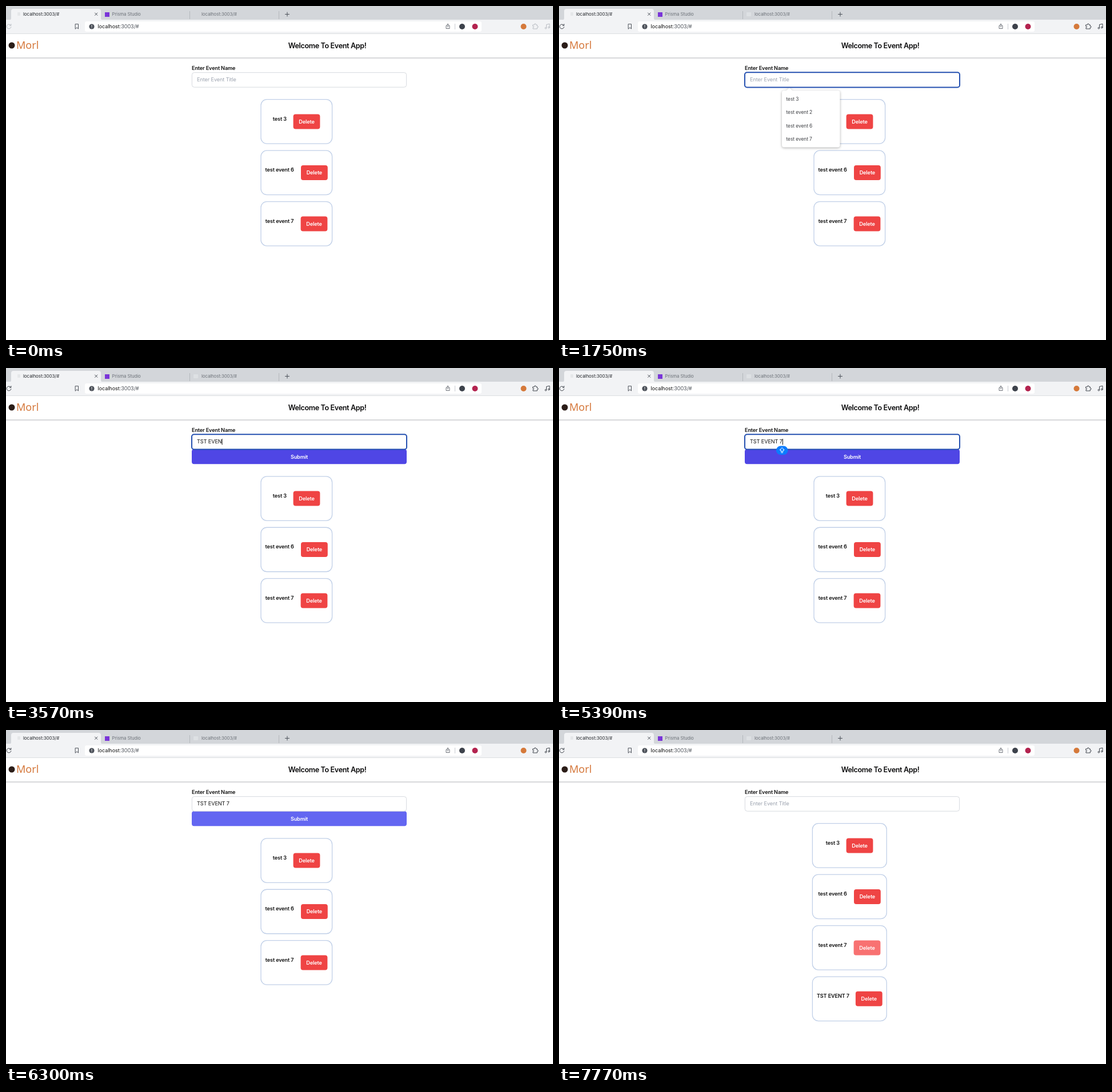
An HTML page that plays this animation: 957x585 px, repeating every 8000 ms.

```html
<!DOCTYPE html>
<html lang="en">
<head>
<title>Event App</title>
<style>
  html, body { margin: 0; width: 100%; height: 100%; overflow: hidden; background: #fff; }
  svg { display: block; width: 957px; height: 585px; }
  text { font: 400 9.14px Inter, sans-serif; letter-spacing: -.01em; fill: #111; white-space: pre; }
  .bold { font-weight: 600; letter-spacing: -.015em; }
  .mid { text-anchor: middle; }
  .white { fill: #fff; }
  .muted { fill: #9ca3af; }
  .tab { font-size: 7.84px; fill: #6c7178; }
  .current { font-size: 8px; fill: #22252a; }
  .menu text { font-size: 8.45px; fill: #3f4145; }
  .title { font-size: 12.6px; font-weight: 600; letter-spacing: -.03em; fill: #0b0b0c; }
  .brand { font: 400 18px "Noto Sans", sans-serif; letter-spacing: 0; fill: #d5783c; }
  .line { fill: none; stroke: #4b5058; stroke-width: 1; stroke-linecap: round; stroke-linejoin: round; }
  .card { fill: #fff; stroke: #c1d0e8; stroke-width: 1.3; }
  .menu { filter: drop-shadow(0 1px 2px #0005); }
</style>
</head>
<body>
<svg viewBox="0 0 957 585">
  <!-- tab strip -->
  <rect width="957" height="25" fill="#d3d6da"/>
  <path d="M5 25q4 0 4-4V9q0-4 4-4H162q4 0 4 4V21q0 4 4 4z" fill="#f2f3f5"/>
  <rect x="20" y="11" width="5" height="6" rx="1" fill="#e6e8ea"/>
  <text class="tab current" x="30" y="14" dy=".36em">localhost:3003/#</text>
  <path class="line" d="M155.5 12l4.4 4.4m0-4.4l-4.4 4.4"/>
  <rect x="173" y="11" width="8" height="8" fill="#7a35d8"/>
  <text class="tab" x="185.5" y="14" dy=".36em">Prisma Studio</text>
  <rect id="favicon" x="328" y="11" width="8" height="7" rx="1" fill="#dde0e3"/>
  <text class="tab" x="342" y="14" dy=".36em">localhost:3003/#</text>
  <path d="M321.5 9v14M477.5 9v14" stroke="#b4b8bd"/>
  <path class="line" d="M488.5 14.5h7m-3.5-3.5v7"/>

  <!-- toolbar -->
  <rect y="24" width="957" height="25" fill="#f2f3f5"/>
  <rect x="138" y="27" width="694" height="18" rx="3" fill="#fff"/>
  <rect y="48" width="957" height="1" fill="#dcdee1"/>
  <g id="tools" class="line">
    <path d="M8.2 33.6A3.9 3.9 0 1 0 8.9 36.8M8.9 31.7v2.5H6.4"/>
    <path d="M922 33h2.5q-.5-2 1.3-2t1.3 2h2.2v2.3q2 0 2 1.2t-2 1.2V40H922V37.6q1.6 0 1.6-1.1t-1.6-1.1z"/>
    <path d="M945.5 38.5v-6l5.5-1.2v6"/>
    <circle cx="944.3" cy="38.7" r="1.3"/><circle cx="949.7" cy="37.5" r="1.3"/>
  </g>
  <path class="line" d="M121.5 31.7h5v8.3L124 37.7 121.5 40z"/>
  <circle cx="150" cy="36" r="4.6" fill="#4c5159"/>
  <path d="M150 33.4v3m0 1.1v1" stroke="#fff"/>
  <text x="160.5" y="36" dy=".36em">localhost<tspan fill="#4f545b">:3003/#</tspan></text>
  <path class="line" d="M771.5 34.5H770V39.5h6V34.5h-1.5M773 37v-5.5m-1.8 1.6L773 31.3l1.8 1.8" style="stroke-width:.8"/>
  <path d="M785.5 31v10" stroke="#c8cbd0"/>
  <circle cx="798" cy="36" r="5" fill="#3d424b"/>
  <circle cx="820.5" cy="36" r="5" fill="#b3234f"/>
  <circle cx="905.5" cy="36" r="5" fill="#d5793a"/>

  <!-- page header -->
  <rect y="90" width="957" height="1" fill="#d5d6d8"/>
  <rect y="91" width="957" height="1" fill="#e0e1e3"/>
  <rect y="92" width="957" height="1" fill="#f3f3f4"/>
  <circle cx="10" cy="69" r="5.5" fill="#2b1d18"/>
  <text class="brand" x="18" y="74.5">Morl</text>
  <text class="title mid" x="562" y="69.5" dy=".36em">Welcome To Event App!</text>

  <!-- form -->
  <text class="bold" x="325" y="108.5" dy=".36em">Enter Event Name</text>
  <g id="submit">
    <rect id="submitBox" x="325" y="142.3" width="376" height="26" rx="4"/>
    <text class="bold white mid" x="513" y="155.5" dy=".36em">Submit</text>
  </g>
  <rect id="field" fill="#fff"/>
  <text id="hint" class="muted" x="334" y="129" dy=".36em">Enter Event Title</text>
  <text id="typed" x="334" y="129" dy=".36em"></text>
  <rect id="caret" y="124" width="1" height="10.5" fill="#111"/>

  <g id="cards"></g>

  <g id="menu" class="menu">
    <path d="M394 148h3q2 0 4-3 2-2.500 4 0 2 3 4 3h78.500q4 0 4 4V243.500q0 4-4 4H394q-4 0-4-4V152q0-4 4-4z" fill="#fff"/>
  </g>

  <g id="caps">
    <rect x="380" y="136.5" width="20.5" height="15.5" rx="7.75" fill="#0a7cff"/>
    <path d="M390.2 139.5l4 4.2h-2.2v2.8h-3.6v-2.8h-2.2zM388.4 148.3h3.6" fill="none" stroke="#fff" stroke-linejoin="round"/>
  </g>
</svg>

<script>
const LOOP = 8000;
const $ = id => document.getElementById(id);
const show = (el, on) => el.style.display = on ? '' : 'none';
const ramp = (t, from, to) => Math.min(1, Math.max(0, (t - from) / (to - from)));

function set(el, attrs) {
  for (const key in attrs) el.setAttribute(key, attrs[key]);
}
function add(parent, tag, attrs, text = '') {
  const el = document.createElementNS('http://www.w3.org/2000/svg', tag);
  set(el, attrs);
  el.textContent = text;
  return parent.appendChild(el);
}

const events = [
  { name: 'test 3', x: 466.8, button: 502.6 },
  { name: 'test event 6', x: 453.5, button: 516 },
  { name: 'test event 7', x: 453.8, button: 515.6 },
  { name: 'TST EVENT 7', x: 451, button: 518.9 }
];
const cards = events.map(({ name, x, button }, i) => {
  const group = add($('cards'), 'g', {});
  const top = 163.7 + i * 89.45;
  const box = add(group, 'rect', { class: 'card', y: top, height: 77.5, rx: 10.4 });
  add(group, 'text', { class: 'bold', x, y: top + 33.8, dy: '.36em' }, name);
  const del = add(group, 'rect', { x: button, y: top + 25.8, width: 46.8, height: 26, rx: 4 });
  add(group, 'text', { class: 'bold white mid', x: button + 23.4, y: top + 38.9, dy: '.36em' }, 'Delete');
  return { group, box, del };
});

['test 3', 'test event 2', 'test event 6', 'test event 7'].forEach((label, i) =>
  add($('menu'), 'text', { x: 397.5, y: 162.8 + i * 23.55, dy: '.36em' }, label));

const entry = 'TST EVENT 7';
const keyTimes = [2240, 2520, 2730, 2870, 3080, 3290, 3360, 3570, 3850, 3990, 4340];
const caretSpans = [[1190, 1750], [2240, 4900], [5390, 5950]];
const SENT = 6440, ADDED = 6580;

function draw(t) {
  const active = t >= 770;
  $('tools').style.stroke = active ? '#3f444c' : '#b9bdc3';
  show($('favicon'), active);

  const focused = t >= 1190 && t < 6300;
  const value = t < SENT ? entry.slice(0, keyTimes.filter(k => t >= k).length) : '';
  set($('field'), focused
    ? { x: 325, y: 116.2, width: 376, height: 26.2, rx: 4, stroke: '#2450b0', 'stroke-width': 2 }
    : { x: 325.4, y: 116.6, width: 375.2, height: 25.6, rx: 4, stroke: '#d3d6dc', 'stroke-width': .9 });
  $('typed').textContent = value;
  show($('hint'), !value);
  show($('caret'), caretSpans.some(([on, off]) => t >= on && t < off));
  set($('caret'), { x: 334 + (value ? $('typed').getComputedTextLength() : 0) });

  show($('submit'), value);
  const hover = t < 5670 ? 0 : t < 5810 ? 1 / 3 : t < 5950 ? 2 / 3 : 1;
  $('submitBox').style.fill = `rgb(${79 + 20 * hover},${70 + 32 * hover},${229 + 12 * hover})`;

  $('menu').style.opacity = ramp(t, 1190, 1400) * (1 - ramp(t, 2450, 2590));
  show($('caps'), t >= 4900 && t < 6300);
  $('caps').style.opacity = t < 4970 ? .6 : 1;

  const added = t >= ADDED;
  set($('cards'), { transform: `translate(0 ${value ? 26.1 : 0})` });
  cards.forEach(({ group, box, del }, i) => {
    show(group, i < 3 || added);
    set(box, added ? { x: 443.4, width: 129.8 } : { x: 446, width: 124.6 });
    del.style.fill = i === 2 && t >= 7770 ? '#f87171' : '#ef4444';
  });
}

const start = performance.now();
function tick() {
  draw((performance.now() - start) % LOOP);
  requestAnimationFrame(tick);
}
tick();
</script>
</body>
</html>
```
